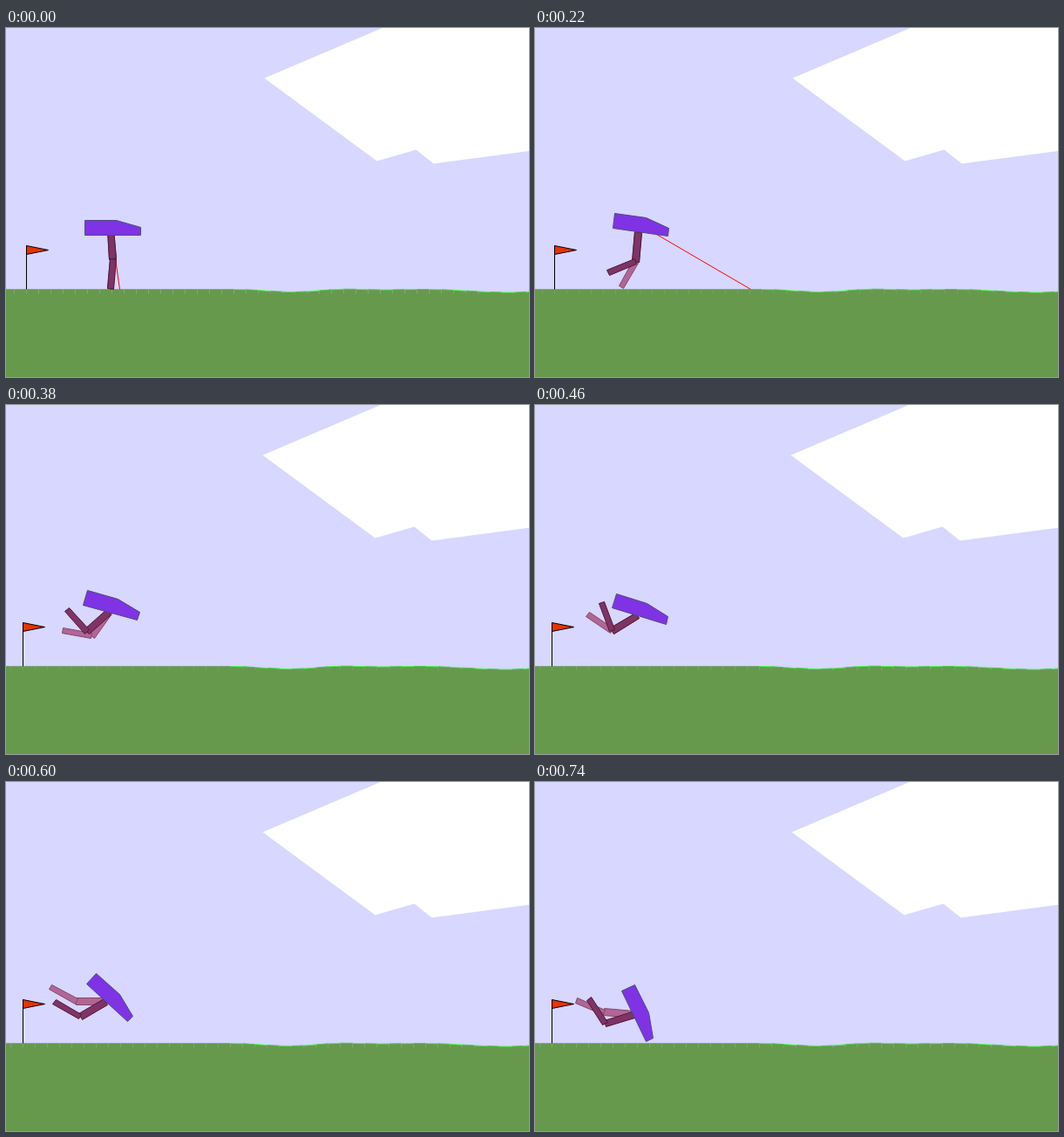
Animation of 600 by 400 pixels, one loop 0.76 s. Source, as an HTML page with a canvas:

```html
<!DOCTYPE html>
<html lang="en">
<head>
<meta charset="utf-8">
<title>Walker</title>
<style>
html, body { margin: 0; width: 100%; height: 100%; overflow: hidden; }
canvas { display: block; }
</style>
</head>
<body>
<canvas id="stage" width="600" height="400"></canvas>
<script>
const ctx = document.getElementById('stage').getContext('2d');
const STEP = 20, STEPS = 38, IMPACT = 23;
const HULL_X = 120, GROUND = 299, LEG = 34, RANGE = 160, TILE = 14, FLAG_X = 23.4;
const SKY = '#d7d7ff', GRASS = '#66994c';

const hullShape = [[-30, -9], [6, -9], [34, -1], [34, 8], [-30, 8]];
const cloud = [[430, 0], [296, 57], [425, 152], [470, 139], [490, 155], [604, 140.5], [604, -1], [432, -1]];
const hillTops = [[261, 299], [330, 302], [390, 298.7], [430, 299.5], [480, 299], [580, 302.6], [630, 300]];

// Smooth 0 to 1 between two positions.
function ease(x, from, to) {
  const u = Math.min(1, Math.max(0, (x - from) / (to - from)));
  return u * u * (3 - 2 * u);
}

function groundAt(x) {
  let y = GROUND;
  for (let i = 1; i < hillTops.length; i++) {
    const [x0, y0] = hillTops[i - 1], [x1, y1] = hillTops[i];
    y += (y1 - y0) * ease(x, x0, x1);
  }
  return y;
}

// Angles are in degrees, clockwise from hanging down. The hull starts to
// tumble when the joints reach their limits at the impact.
function poseAt(step) {
  const swing = (from, to, amount) => amount * ease(step, from, to);
  const tumble = Math.max(0, (step - IMPACT) / (STEPS - 1 - IMPACT));
  return {
    flagX: FLAG_X - swing(0, 11, 1.3) - swing(10, 23, 3) + swing(23, 27, 0.5),
    y: 225.9 + (step < 11 ? 0.026 : 0.0555) * (step - 11) ** 2,
    tilt: swing(0, IMPACT, 17) + 47 * tumble ** 0.88,
    farThigh: -4 + swing(0, 7, 9) + swing(10, 33, 90),
    farShin: 5 + swing(0, 8, 24) + swing(11, IMPACT, 96) - swing(IMPACT, 37, 12.5),
    nearThigh: -5 - swing(0, 6, 6) + swing(5, 24, 71) + swing(30, 37, 12.5),
    nearShin: 5 + swing(0, 8, 48) + swing(7, 24, 108) - swing(IMPACT, 30, 41.5) + swing(30, 37, 28)
  };
}

// Vertices snap to whole pixels.
function trace(points) {
  ctx.beginPath();
  for (const [x, y] of points) ctx.lineTo(Math.floor(x), Math.floor(y));
}

function polygon(points, fill, outline) {
  trace(points);
  ctx.closePath();
  ctx.fillStyle = fill;
  ctx.fill();
  if (outline) {
    ctx.strokeStyle = outline;
    ctx.stroke();
  }
}

function line(points, color) {
  trace(points);
  ctx.strokeStyle = color;
  ctx.stroke();
}

const place = (x, y, degrees) => {
  const angle = degrees * Math.PI / 180, s = Math.sin(angle), c = Math.cos(angle);
  return ([px, py]) => [x + px * c - py * s, y + px * s + py * c];
};

function limb([x, y], degrees, width, fill, outline) {
  const toStage = place(x, y, degrees), w = width / 2;
  polygon([[-w, 0], [w, 0], [w, LEG], [-w, LEG]].map(toStage), fill, outline);
  return toStage([0, LEG]);
}

function leg(hip, thigh, shin, fill, outline) {
  const knee = limb(hip, thigh, 8, fill, outline);
  limb(knee, shin, 6.4, fill, outline);
}

function drawScene(shift) {
  ctx.fillStyle = SKY;
  ctx.fillRect(-1, -1, 602, 402);
  polygon(cloud.map(([x, y]) => [x + shift / 2, y]), '#fff');

  const firstHill = hillTops[0][0];
  for (let x = firstHill - 19 * TILE, i = 0; x < 620; x += TILE, i++) {
    const left = x + shift, right = left + TILE, y0 = groundAt(x), y1 = groundAt(x + TILE);
    ctx.beginPath();
    ctx.moveTo(left, y0);
    ctx.lineTo(right, y1);
    ctx.strokeStyle = x < firstHill ? '#80a880' : i % 2 ? '#4cff4c' : '#4ccc4c';
    ctx.lineTo(right, 402);
    ctx.lineTo(left, 402);
    ctx.fillStyle = GRASS;
    ctx.fill();
    ctx.fillRect(Math.floor(left), GROUND + 5, TILE + 1, 100);
    ctx.beginPath();
    ctx.moveTo(left, y0);
    ctx.lineTo(right, y1);
    ctx.stroke();
  }
}

// The beam sweeps forward and back once, one of ten directions per step.
function drawBeam(step, y) {
  const turn = step + 1;
  if (turn > 19) return;
  const angle = 0.15 * (turn < 10 ? turn : 19 - turn);
  const length = Math.min(RANGE, (GROUND - y) / Math.cos(angle));
  line([[HULL_X, y], [HULL_X + length * Math.sin(angle), y + length * Math.cos(angle)]], '#f00');
}

function drawFlag(x) {
  line([[x, GROUND], [x, GROUND - 50]], '#000');
  polygon([[x, GROUND - 50], [x, GROUND - 40], [x + 25, GROUND - 45]], '#e63300', '#000');
}

function draw(step) {
  const pose = poseAt(step);
  const toStage = place(HULL_X, pose.y, pose.tilt);
  const hip = toStage([0, 8 - 6 * 0.4 ** step]); // the hip joint settles at the start

  ctx.setTransform(1, 0, 0, 1, 0.5, 0.5);
  drawScene(pose.flagX - FLAG_X);
  drawBeam(step, pose.y);
  leg(hip, pose.farThigh, pose.farShin, '#b26598', '#7f4c65');
  leg(hip, pose.nearThigh, pose.nearShin, '#803366', '#4d1a33');
  polygon(hullShape.map(toStage), '#7f33e5', '#4c4c7f');
  drawFlag(pose.flagX);
}

function tick() {
  draw(Math.floor(performance.now() / STEP) % STEPS);
  requestAnimationFrame(tick);
}
tick();
</script>
</body>
</html>
```
